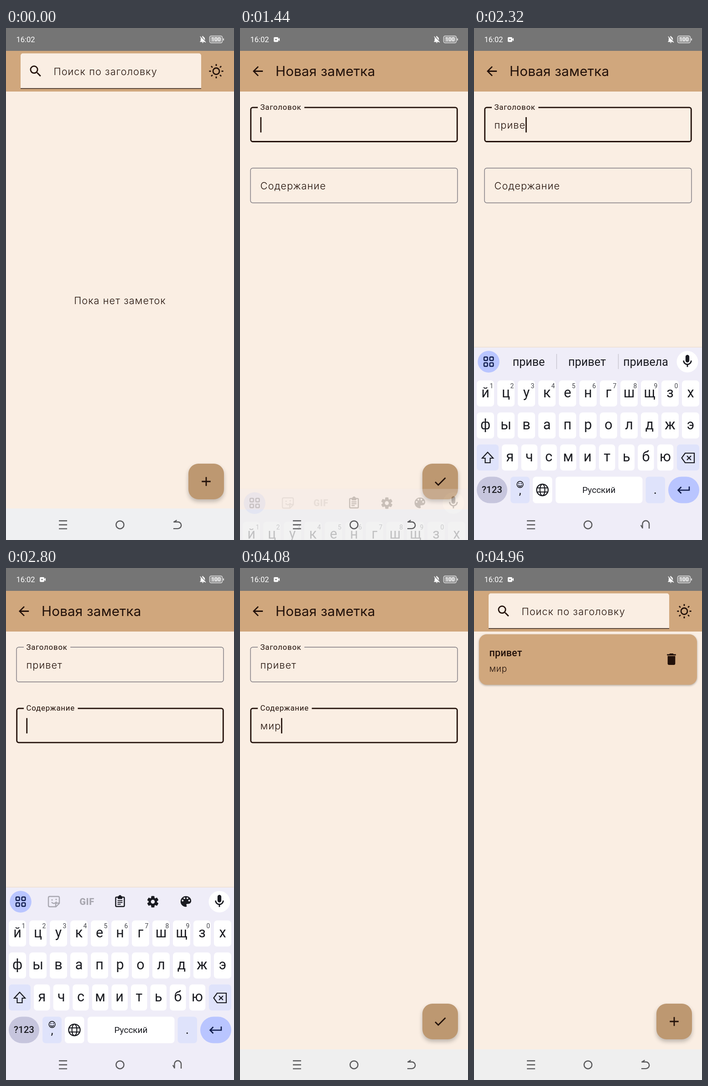
An HTML page with a canvas for the animation above (5040 ms loop, 500x1120 px).

```html
<!DOCTYPE html>
<html lang="ru">
<head>
<meta charset="utf-8">
<title>Заметки</title>
<style>
html, body { margin: 0; width: 100%; height: 100%; overflow: hidden; background: #faeee3; }
canvas { display: block; width: 500px; height: 1120px; }
</style>
</head>
<body>
<canvas id="stage" width="500" height="1120"></canvas>
<script>
const W = 500, H = 1120, LOOP = 5040, STEP = 80;
const CREAM = '#faeee3', TAN = '#d0a77d', FAB = '#bd9871', DARK = '#22110a', INK = '#1a1b21';
const stage = document.getElementById('stage').getContext('2d');
const makeLayer = () => {
  const c = document.createElement('canvas');
  c.width = W; c.height = H;
  return c.getContext('2d');
};
const layer = makeLayer();
let g = stage;

const ICONS = {
  search: 'M15.5 14h-.79l-.28-.27A6.47 6.47 0 0 0 16 9.5 6.5 6.5 0 1 0 9.5 16c1.61 0 3.09-.59 4.23-1.57l.27.28v.79l5 4.99L20.49 19zM9.5 14a4.5 4.5 0 1 1 0-9 4.5 4.5 0 0 1 0 9z',
  trash: 'M6 19c0 1.1.9 2 2 2h8c1.1 0 2-.9 2-2V7H6zM19 4h-3.5l-1-1h-5l-1 1H5v2h14z',
  back: 'M20 11H7.83l5.59-5.59L12 4l-8 8 8 8 1.41-1.41L7.83 13H20z',
  check: 'M9 16.17L4.83 12l-1.42 1.41L9 19 21 7l-1.41-1.41z',
  plus: 'M19 13h-6v6h-2v-6H5v-2h6V5h2v6h6z',
  mic: 'M12 14c1.66 0 3-1.34 3-3V5a3 3 0 0 0-6 0v6c0 1.66 1.34 3 3 3zM17 11a5 5 0 0 1-10 0H5c0 3.53 2.61 6.43 6 6.92V21h2v-3.08c3.39-.49 6-3.39 6-6.92z',
  palette: 'M12 3a9 9 0 0 0 0 18c.83 0 1.5-.67 1.5-1.5 0-.39-.15-.74-.39-1.01-.23-.26-.38-.61-.38-.99 0-.83.67-1.5 1.5-1.5H16c2.76 0 5-2.24 5-5 0-4.42-4.03-8-9-8zM6.5 12a1.5 1.5 0 1 1 0-3 1.5 1.5 0 0 1 0 3zM9.5 8a1.5 1.5 0 1 1 0-3 1.5 1.5 0 0 1 0 3zM14.5 8a1.5 1.5 0 1 1 0-3 1.5 1.5 0 0 1 0 3zM17.5 12a1.5 1.5 0 1 1 0-3 1.5 1.5 0 0 1 0 3z',
  bellOff: 'M20 18.69L5.27 3.49 4 4.76l2.8 2.8c-.52.99-.8 2.16-.8 3.43v5l-2 2v1h13.73l2 2L21 19.72zM12 22c1.11 0 2-.89 2-2h-4c0 1.11.89 2 2 2zM18 14.68V11c0-3.08-1.64-5.64-4.5-6.32V4a1.5 1.5 0 0 0-3 0v.68l-.42.12z'
};
for (const k in ICONS) ICONS[k] = new Path2D(ICONS[k]);

const clamp = v => Math.max(0, Math.min(1, v));
const span = (t, a, b) => clamp((t - a) / (b - a));
const smooth = p => p * p * (3 - 2 * p);
const inter = (size, weight = 400) => `${weight} ${size}px Inter, sans-serif`;
const roboto = (size, weight = 400) => `${weight} ${size}px Roboto, sans-serif`;
const BODY_SIZE = 21.7, BODY_SPACING = 1.1;

function rect(x, y, w, h, r, color) {
  g.beginPath();
  g.roundRect(x, y, w, h, r);
  g.fillStyle = color;
  g.fill();
}
function frame(x, y, w, h, r, color, width) {
  g.beginPath();
  g.roundRect(x, y, w, h, r);
  stroke(color, width);
}
function stroke(color, width) {
  g.strokeStyle = color;
  g.lineWidth = width;
  g.stroke();
}
function disc(x, y, r, color) {
  g.beginPath();
  g.arc(x, y, r, 0, 7);
  g.fillStyle = color;
  g.fill();
}
function ring(x, y, r, color, width) {
  g.beginPath();
  g.arc(x, y, r, 0, 7);
  stroke(color, width);
}
function line(path, color, width) {
  g.strokeStyle = color;
  g.lineWidth = width;
  g.stroke(new Path2D(path));
}
function icon(name, x, y, color, scale = 1.39) {
  g.save();
  g.translate(x, y);
  g.scale(scale, scale);
  g.translate(-12, -12);
  g.fillStyle = color;
  g.fill(ICONS[name]);
  g.restore();
}
function text(s, x, y, font, color = DARK, align = 'left', spacing = 0) {
  g.font = font;
  g.letterSpacing = spacing + 'px';
  g.textAlign = align;
  g.fillStyle = color;
  g.fillText(s, x, y);
  return g.measureText(s).width;
}
function shadowed(dy, blur, alpha, draw) {
  g.save();
  g.shadowColor = `rgba(0,0,0,${alpha})`;
  g.shadowOffsetY = dy;
  g.shadowBlur = blur;
  draw();
  g.restore();
}

function topBar() {
  g.fillStyle = CREAM;
  g.fillRect(0, 0, W, H);
  g.fillStyle = TAN;
  g.fillRect(0, 50, W, 89);
}
function fab(name) {
  shadowed(5, 10, .24, () => rect(400, 953, 78, 78, 22, FAB));
  icon(name, 439, 992, DARK);
}

function sun(x, y) {
  ring(x, y, 7, DARK, 2.8);
  for (let i = 0; i < 8; i++) {
    const a = i * Math.PI / 4, c = Math.cos(a), s = Math.sin(a);
    g.beginPath();
    g.moveTo(x + c * 11.5, y + s * 11.5);
    g.lineTo(x + c * 15.6, y + s * 15.6);
    stroke(DARK, 2.8);
  }
}

function home(hasNote) {
  topBar();
  rect(32, 55.5, 396, 77.5, [5, 5, 0, 0], CREAM);
  g.fillStyle = DARK;
  g.fillRect(32, 131.7, 396, 1.4);
  icon('search', 65, 94.5, DARK);
  text('Поиск по заголовку', 104.5, 102.5, inter(BODY_SIZE, 300), DARK, 'left', BODY_SPACING);
  sun(461, 94.5);
  if (hasNote) {
    shadowed(1.5, 4, .3, () => rect(11, 145, 478, 110.5, 17, TAN));
    text('привет', 33.5, 193, roboto(21.4, 500), DARK, 'left', .2);
    text('мир', 33.5, 226.5, inter(19, 300), DARK, 'left', .8);
    icon('trash', 433, 199.5, DARK);
  } else {
    text('Пока нет заметок', 250, 604, inter(BODY_SIZE, 300), DARK, 'center', BODY_SPACING);
  }
  fab('plus');
}

// lift: 0 = label rests inside the box, 1 = label sits on the border
function field(y, label, value, lift, focused, cursor) {
  const width = focused ? 1.4 + 1.4 * lift : 1.4, o = width / 2;
  frame(22.3 + o, y + o, 455.4 - width, 77.4 - width, 5.6 - o, focused ? DARK : '#7c7980', width);
  const size = BODY_SIZE + (16.8 - BODY_SIZE) * lift;
  const font = lift > .5 ? roboto(size) : inter(size, 300);
  const spacing = BODY_SPACING + (.8 - BODY_SPACING) * lift;
  g.font = font;
  g.letterSpacing = spacing + 'px';
  if (lift > 0) {
    const gap = (g.measureText(label).width + 12) * lift;
    g.fillStyle = CREAM;
    g.fillRect(39, y - 1, gap, 5);
  }
  text(label, 44.5, y + 47 - 41 * lift, font, DARK, 'left', spacing);
  const end = text(value, 44.5, y + 47, inter(BODY_SIZE, 300), DARK, 'left', BODY_SPACING);
  if (cursor) {
    g.fillStyle = DARK;
    g.fillRect(44.4 + end, y + 22.5, 2.7, 33.5);
  }
}

const TITLE = 'привет', BODY = 'мир';
const titleTimes = [1800, 1920, 2040, 2160, 2240, 2400];
const bodyTimes = [2880, 2960, 3080];
const FOCUS_1 = 1230, FOCUS_2 = 2590;
const typed = (times, t) => times.filter(k => k <= t).length;

function editor(t) {
  const first = t >= FOCUS_1 && t < FOCUS_2, second = t >= FOCUS_2;
  const last = [FOCUS_1, ...titleTimes, FOCUS_2, ...bodyTimes].filter(k => k <= t).pop() || 0;
  const blink = Math.floor((t - last) / 500) % 2 === 0;
  topBar();
  icon('back', 39, 94.5, DARK);
  text('Новая заметка', 78, 104.5, inter(29.6), DARK, 'left', .2);
  field(172.5, 'Заголовок', TITLE.slice(0, typed(titleTimes, t)), smooth(span(t, FOCUS_1, 1380)), first, first && blink);
  field(305.8, 'Содержание', BODY.slice(0, typed(bodyTimes, t)), smooth(span(t, FOCUS_2, 2740)), second, second && blink);
  fab('check');
}

const HINTS = {
  'п': ['привет', 'по'], 'пр': ['привет', 'при'], 'при': ['привет', 'придёт'],
  'прив': ['привет', 'приват'], 'приве': ['привет', 'привела'], 'привет': ['приветик', 'привета'],
  'м': ['мы', 'меня'], 'ми': ['мир', 'минут'], 'мир': ['', 'мира']
};

function peace(x, y) {
  rect(x - 14, y - 14, 28, 28, 4, '#9d4dc6');
  ring(x, y, 9.3, '#fff', 2.3);
  line(`M${x} ${y - 9}v18M${x} ${y}l-6.5 6.5M${x} ${y}l6.5 6.5`, '#fff', 2.2);
}

function toolIcons() {
  const pale = '#a9a8b1';
  line('M96 718.5h18q3 0 3 3v12l-7.5 7.5h-13.5q-3 0-3-3v-16.5q0-3 3-3M117 733h-5q-3 0-3 3v5', pale, 2.4);
  disc(101, 726, 1.6, pale);
  disc(110, 725, 1.6, pale);
  line('M100 731q5 6 11-1', pale, 2.6);
  text('GIF', 177.5, 736.5, roboto(20, 900), pale, 'center', .6);
  frame(240.5, 720, 19, 20.5, 2, INK, 2.5);
  rect(245, 718, 10, 6, 1, INK);
  disc(250, 718.5, 3, INK);
  line('M244.5 727.5h11M244.5 731.5h11M244.5 735.5h7', INK, 2.2);
  for (let i = 0; i < 6; i++) {
    g.save();
    g.translate(322, 730);
    g.rotate(i * Math.PI / 3);
    rect(-3.6, -12.5, 7.2, 7, 1.5, INK);
    g.restore();
  }
  ring(322, 730, 6.8, INK, 5);
  icon('palette', 394.5, 729.5, INK, 1.3);
}

function suggestions(word) {
  const [mid, right] = HINTS[word];
  const font = roboto(25);
  text(word, 120, 739, font, INK, 'center');
  if (mid) text(mid, 248, 739, font, INK, 'center');
  else peace(248, 730);
  text(right, 376.5, 739, font, INK, 'center');
  g.fillStyle = '#c9c8d2';
  g.fillRect(180.5, 713, 1.5, 33);
  g.fillRect(315.8, 713, 1.5, 33);
}

function keyRow(letters, x, y, pitch, w) {
  [...letters].forEach((ch, i) => {
    const kx = x + pitch * i;
    rect(kx, y, w, 57, 7, '#fff');
    text(ch, kx + w / 2, y + 36.5, roboto(30.5), INK, 'center');
    if (y < 800 && i < 10) text((i + 1) % 10, kx + 32.5, y + 16.5, roboto(14), '#44454c', 'center');
  });
}

function keyboard(word) {
  const SOFT = '#dfe3fb', BLUE = '#b9c5ff', NAVY = '#101c4b';
  shadowed(0, 3, .15, () => rect(0, 699, W, 421, 0, '#efedf8'));
  disc(32, 730, 23.8, BLUE);
  for (const x of [22, 34.7]) for (const y of [719.7, 732.4]) frame(x, y, 7.6, 7.6, 1.8, NAVY, 2.4);
  disc(468, 730, 23.5, '#fff');
  icon('mic', 468, 729, INK);
  if (word) suggestions(word);
  else toolIcons();

  keyRow('йцукенгшщзх', 6, 771, 45, 38);
  keyRow('фывапролджэ', 6, 841, 45, 38);
  keyRow('ячсмитьбю', 61, 911, 42.6, 35.5);

  rect(6, 911, 48, 57, 7, SOFT);
  line('M30 928l-12 13h6.5v10h11v-10h6.5z', INK, 2.2);
  rect(445, 911, 49, 57, 7, SOFT);
  line('M463 930h20v21h-20l-7.5-10.5zM467 936l9 9M476 936l-9 9', INK, 2.2);

  rect(6, 981.5, 67, 58, 29, '#c6c5dd');
  text('?123', 39.5, 1017, roboto(20.5, 500), INK, 'center');
  rect(80, 981.5, 42, 58, 7, SOFT);
  ring(101, 998.5, 6.8, INK, 1.7);
  disc(98.5, 996.5, 1.2, INK);
  disc(103.5, 996.5, 1.2, INK);
  line('M97 1000q4 5 8 0', INK, 1.8);
  text(',', 101, 1020, roboto(26), INK, 'center');
  rect(129, 981.5, 42.5, 58, 7, '#fff');
  ring(150, 1010.5, 12.6, INK, 2.3);
  g.beginPath();
  g.ellipse(150, 1010.5, 5.4, 12.6, 0, 0, 7);
  stroke(INK, 2.2);
  line('M138.5 1006h23M138.5 1015h23', INK, 2.2);
  rect(179, 981.5, 190.5, 58, 7, '#fff');
  text('Русский', 274, 1017, roboto(19), INK, 'center');
  rect(376.5, 981.5, 42.5, 58, 7, SOFT);
  text('.', 397.5, 1019, roboto(28), INK, 'center');
  rect(426, 981.5, 68, 58, 29, BLUE);
  line('M472 1003v8h-24M454.5 1004l-7 7 7 7', NAVY, 2.6);
}

function statusBar(recording) {
  g.fillStyle = '#757575';
  g.fillRect(0, 0, W, 50);
  text('16:02', 22.5, 31.3, roboto(16.5), '#fff');
  if (recording) {
    rect(74, 20, 10, 10.5, 2, '#fff');
    g.fillStyle = '#fff';
    g.fill(new Path2D('M83 25l4-3.5v7.5z'));
    disc(79, 25.2, 1.6, '#757575');
  }
  icon('bellOff', 431.5, 25, '#fff', .78);
  frame(446.5, 17.5, 28, 15, 3.5, '#e6e6e6', 1.4);
  rect(448.5, 19.5, 24, 11, 2, '#adadad');
  rect(476, 22.5, 2, 5, 1, '#e6e6e6');
  text('100', 460.5, 29.2, roboto(12, 500), '#fff', 'center');
}

function navIcons(turned) {
  const color = '#59595b';
  line('M116 1078h18M116 1086.7h18M116 1095.4h18', color, 2.4);
  ring(250, 1086.8, 8.6, color, 2.5);
  g.save();
  g.translate(375.5, 1086.5);
  if (turned) g.rotate(-Math.PI / 2);
  line('M-8-6h9.5a7.3 7.3 0 0 1 0 14.6h-10M-8-5.5l7-4.2', color, 2.4);
  g.restore();
}

function blend(alpha, draw) {
  if (alpha <= 0) return;
  g = layer;
  g.clearRect(0, 0, W, H);
  draw();
  g = stage;
  g.globalAlpha = alpha;
  g.drawImage(layer.canvas, 0, 0);
  g.globalAlpha = 1;
}

function render(t) {
  const enter = smooth(span(t, 590, 1230));
  const leave = smooth(span(t, 4290, 4960));
  const edit = enter * (1 - leave);
  g = stage;
  g.fillStyle = CREAM;
  g.fillRect(0, 0, W, H);
  blend(1 - edit, () => home(t > 3000));
  blend(edit, () => editor(t));
  g.fillStyle = t < 560 ? '#eff0f2' : '#efefef';
  g.fillRect(0, t < 560 ? 1051 : 1053, W, 69);

  const opened = span(t, 1380, 1660), closed = span(t, 3590, 3840);
  const shown = (1 - Math.pow(1 - opened, 1.28)) * (1 - smooth(closed));
  if (shown > 0) {
    const word = t < FOCUS_2 ? TITLE.slice(0, typed(titleTimes, t)) : BODY.slice(0, typed(bodyTimes, t));
    blend(opened * (1 - closed), () => {
      g.save();
      g.translate(0, 421 * (1 - shown));
      keyboard(word);
      g.restore();
    });
  }
  statusBar(t >= 160);
  navIcons(shown > .5);
}

function tick() {
  const t = performance.now() % LOOP;
  render(Math.floor(t / STEP) * STEP);
  requestAnimationFrame(tick);
}
tick();
</script>
</body>
</html>
```
